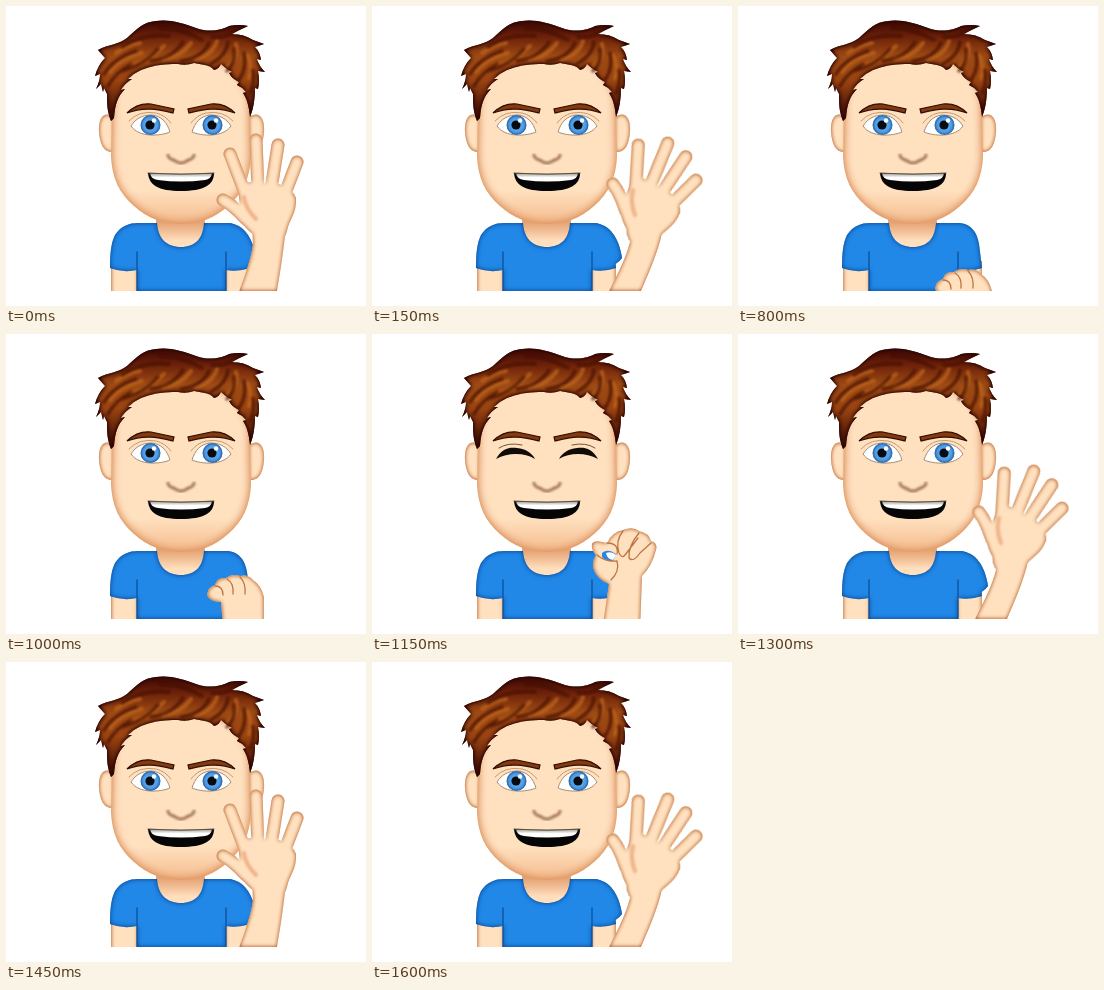
Animation of 360x300 px, one loop 1750 ms. Source, as an HTML page:

```html
<!DOCTYPE html>
<html lang="en">
<head>
<meta charset="utf-8">
<title>Waving cartoon man</title>
<style>
  html, body { margin: 0; width: 100%; height: 100%; overflow: hidden; background: #fff; }
  svg { display: block; width: 360px; height: 300px; }
  .skin { fill: #ffe1c0; }
  .shirt { fill: #2188e8; }
  .line { fill: none; stroke-linecap: round; stroke-linejoin: round; }
  .crease { stroke: #bd7544; stroke-width: 1.3; }
  .finger { stroke: #ffe1c0; }
  .strand { stroke: #420b05; stroke-width: 3; opacity: .75; filter: url(#soften); }
  .shine { stroke: #bd651f; stroke-width: 4; opacity: .75; filter: url(#soften); }
</style>
</head>
<body>
<svg viewBox="0 0 360 300">
  <defs>
    <clipPath id="frame"><rect width="360" height="285"/></clipPath>
    <filter id="soften" x="-20%" y="-20%" width="140%" height="140%"><feGaussianBlur stdDeviation="1"/></filter>
    <linearGradient id="neckShade" x1="0" y1="0" x2="0" y2="1">
      <stop offset=".35" stop-color="#e5a273"/><stop offset=".8" stop-color="#ffdfbd"/>
    </linearGradient>
    <linearGradient id="faceShade" x1="0" y1="0" x2="0" y2="1">
      <stop offset=".8" stop-color="#ffe1c0"/><stop offset="1" stop-color="#f4bb8d"/>
    </linearGradient>
    <linearGradient id="hairShade" x1="0" y1="0" x2="0" y2="1">
      <stop offset="0" stop-color="#3d0805"/><stop offset=".16" stop-color="#6b2109"/>
      <stop offset=".36" stop-color="#9d4a14"/><stop offset=".6" stop-color="#994411"/>
      <stop offset=".9" stop-color="#4d1407"/>
    </linearGradient>
    <linearGradient id="toothShade" x1="0" y1="0" x2="0" y2="1">
      <stop offset="0" stop-color="#a4a299"/><stop offset=".5" stop-color="#fff"/>
    </linearGradient>
    <radialGradient id="iris">
      <stop offset=".3" stop-color="#65b5f4"/><stop offset=".75" stop-color="#4997e4"/>
      <stop offset="1" stop-color="#285b94"/>
    </radialGradient>
    <path id="eyeWhite" d="M125 120C130 112 137 109 146 109C155 110 161 116 164 126C155 130 133 132 125 120Z" fill="#fff" stroke="#a28e75"/>
    <path id="lidCrease" class="line" d="M123 115Q133 104 150 107Q159 109 165 117" stroke="#c39a73"/>
    <g id="iris-pupil">
      <circle cx="144.500" cy="119" r="10" fill="url(#iris)"/>
      <circle cx="144" cy="119" r="4.600" fill="#070b10"/>
      <circle cx="148" cy="114.500" r="2.200" fill="#fff"/>
    </g>
    <g id="closedEye">
      <path d="M124 125C130 114 138 113 145 114C154 115 160 119 163 125C153 119 137 118 124 125Z" fill="#110b08"/>
      <path class="line" d="M127 114Q136 108 150 111" stroke="#6f5140"/>
    </g>
    <path id="brow" d="M121 107C127 101 135 97 145 98L168 103L167 107C154 104 139 100 121 107Z" fill="#843a0c" stroke="#2d0d05" stroke-width="1.200"/>
  </defs>

  <g clip-path="url(#frame)">
    <g filter="url(#skinEdge)"><path class="skin" d="M105 255H132V297H105ZM219 255H244V297H219Z"/></g>
    <path d="M150 202H199V229Q194 243 175 243Q155 243 150 229Z" fill="url(#neckShade)"/>
    <g filter="url(#blueEdge)">
      <path class="shirt" d="M151 217C152 232 160 241 175 241C190 241 197 232 198 217L222 217C233 218 239 226 241 238L244 262Q232 266 220 264V297H131V264Q117 267 104 262C104 248 105 237 109 229C115 220 123 217 132 217Z"/>
      <path class="shirt" id="raisedSleeve" d="M205 217H222C238 218 247 232 250 252Q242 263 220 264L205 235Z"/>
    </g>
    <path class="line" d="M131 246V285M220 246V285" stroke="#10549c" stroke-width="1.400"/>

    <g filter="url(#skinEdge)">
      <path class="skin" d="M108 111C98 104 92 112 93 126C94 139 98 147 108 146Z"/>
      <path class="skin" d="M243 111C253 104 259 112 258 126C257 139 253 147 243 146Z"/>
    </g>
    <g filter="url(#faceEdge)">
      <path fill="url(#faceShade)" d="M106 95C110 64 133 48 175 48C217 48 240 64 244 95L245 150C244 172 237 187 222 200C208 212 194 218 175 218C156 218 142 212 128 200C113 187 106 172 105 150Z"/>
    </g>

    <g filter="url(#hairEdge)">
      <path fill="url(#hairShade)" d="M105 115C101 105 101 97 101 88L98 82L97 86L95 78L90 83Q94 75 94 68L89 70Q92 59 99 52L92 44C103 38 112 39 121 32C131 23 137 16 150 15C163 13 176 17 190 22C203 27 216 24 223 20Q233 18 242 20Q233 24 226 28Q238 28 247 34L258 38L249 41Q254 46 255 54L251 53Q253 60 259 66L252 65Q254 75 252 83L249 82C249 94 247 104 244 111C243 100 241 93 237 87L240 86Q236 81 231 79L233 76Q226 73 223 67L226 66Q219 62 215 58Q213 63 208 64Q205 60 199 59L188 57Q180 60 172 58Q151 57 135 64Q128 67 122 73L126 73Q119 77 115 84L119 83C112 90 109 98 108 112Z"/>
    </g>
    <g clip-path="url(#frame)">
      <path class="line shine" d="M104 66Q114 52 136 47M124 60Q145 54 158 40M157 53Q175 51 185 37M190 53Q207 49 211 35M222 60Q233 51 230 38M243 72Q247 62 241 49M110 47Q122 39 134 37"/>
      <path class="line strand" d="M98 68Q108 52 130 45M102 80Q110 66 125 58M115 65Q137 60 152 43M145 55Q167 52 177 36M175 55Q196 52 203 37M205 58Q220 50 222 36M221 65Q230 56 228 43M233 74Q241 63 238 47M244 87Q249 77 247 64M116 41Q136 27 163 30M154 22Q176 22 196 34M206 31Q217 32 226 27"/>
    </g>

    <g id="openEyes">
      <use href="#eyeWhite"/><use href="#eyeWhite" transform="matrix(-1 0 0 1 350 0)"/>
      <use href="#iris-pupil"/><use href="#iris-pupil" x="62"/>
      <use href="#lidCrease"/><use href="#lidCrease" transform="matrix(-1 0 0 1 350 0)"/>
    </g>
    <g id="closedEyes"><use href="#closedEye"/><use href="#closedEye" transform="matrix(-1 0 0 1 350 0)"/></g>
    <use href="#brow"/><use href="#brow" transform="matrix(-1 0 0 1 350 0)"/>
    <path class="line" d="M162 149C162 154 168 153 171 156Q175 158 179 156C182 153 188 154 188 149" stroke="#a6795b" stroke-width="3" filter="url(#soften)"/>
    <path d="M142 167Q175 169 208 167C208 179 198 185 175 185C152 185 143 179 142 167Z" fill="#050505"/>
    <path d="M144 167.500Q175 169 206 167.500Q205 173 199 174Q175 177 152 174Q145 173 144 167.500Z" fill="url(#toothShade)"/>
    <path class="line" d="M142 167Q175 169 208 167" stroke="#5b5047" stroke-width="1.200"/>

    <g id="wave" filter="url(#skinEdge)">
      <path class="skin" id="forearmIn" d="M246 219H280C278 242 275 262 269 297H229C237 274 245 255 247 238Z"/>
      <path class="skin" id="forearmOut" d="M258 222L290 227C286 247 276 268 264 297H231C243 273 254 253 258 236Z"/>
      <g id="hand">
        <path class="skin" d="M232 181Q240 174 254 177L273 178Q287 183 290 192C291 207 283 214 281 225Q277 239 265 241Q252 240 248 229C236 220 231 211 234 202Z"/>
        <path class="line finger" d="M217 194Q227 199 240 213M224 148L239 187M272 139L265 183M250 134L252 184M291 156L278 190" stroke-width="13"/>
        <path class="line" d="M238 191Q239 202 250 213" stroke="#efb488" stroke-width="4" filter="url(#soften)"/>
      </g>
    </g>

    <g id="restHand">
      <g filter="url(#skinEdge)">
        <path class="skin" d="M197 283Q198 275 205 273Q207 265 216 266Q222 261 230 264Q238 262 243 268Q251 273 254 285V325H214L211 290Q200 290 197 283Z"/>
      </g>
      <path class="line crease" d="M205 274Q213 274 213 283M217 267Q224 271 223 282M230 265Q236 271 235 282"/>
    </g>

    <g id="fist">
      <g filter="url(#skinEdge)">
        <path class="skin" d="M220 210Q222 206 230 208L235 209Q240 198 251 196Q261 192 267 197Q277 199 279 207Q286 209 284 216Q280 232 270 242L268 297H230L237 250Q225 245 222 236Q219 228 224 221Q219 216 220 210Z"/>
      </g>
      <path d="M230 219Q236 214 244 220L241 227Q235 228 230 223Z" fill="#2188e8"/>
      <path d="M234 219Q240 217 244 221L241 226Q235 225 234 219Z" fill="#fff"/>
      <path class="line crease" d="M235 209Q247 209 245 220M251 197Q243 207 247 219Q250 225 253 221L266 204M267 199Q256 212 257 224Q261 229 268 219L279 209M225 221Q233 228 245 227Q248 237 239 246"/>
    </g>
  </g>
</svg>
<script>
  const LOOP = 1750;
  const byId = id => document.getElementById(id);

  // Soft coloured shading just inside a shape's outline.
  function edgeFilter(id, color, blur, strength) {
    document.querySelector('defs').insertAdjacentHTML('beforeend', `
      <filter id="${id}" x="-10%" y="-10%" width="120%" height="120%" color-interpolation-filters="sRGB">
        <feGaussianBlur in="SourceAlpha" stdDeviation="${blur}" result="soft"/>
        <feFlood flood-color="${color}"/>
        <feComposite in2="soft" operator="out"/>
        <feComponentTransfer><feFuncA type="linear" slope="${strength}"/></feComponentTransfer>
        <feComposite in2="SourceAlpha" operator="in" result="edge"/>
        <feMerge><feMergeNode in="SourceGraphic"/><feMergeNode in="edge"/></feMerge>
      </filter>`);
  }
  edgeFilter('skinEdge', '#c9804f', 2.2, 1.7);
  edgeFilter('faceEdge', '#dd935f', 5, 1.6);
  edgeFilter('blueEdge', '#0b4d99', 2.5, 1.3);
  edgeFilter('hairEdge', '#2c0503', 2.5, 1.8);

  // Each step is [start time, value], held until the next step.
  function hold(id, property, steps) {
    const frames = steps.map(([time, value]) =>
      ({ offset: time / LOOP, [property]: value, easing: 'steps(1, end)' }));
    frames.push({ offset: 1, [property]: steps.at(-1)[1] });
    byId(id).animate(frames, { duration: LOOP, iterations: Infinity }).startTime = 0;
  }

  const poses = [
    [0, 'in'], [150, 'out'], [800, 'rest'], [1000, 'rise'],
    [1150, 'fist'], [1300, 'out'], [1450, 'in'], [1600, 'out']
  ];
  const show = (id, ...names) => hold(id, 'opacity',
    poses.map(([time, pose]) => [time, names.includes(pose) ? 1 : 0]));

  show('wave', 'in', 'out');
  show('forearmIn', 'in');
  show('forearmOut', 'out');
  show('raisedSleeve', 'in', 'out');
  show('restHand', 'rest', 'rise');
  show('fist', 'fist');
  show('closedEyes', 'fist');
  show('openEyes', 'in', 'out', 'rest', 'rise');

  byId('hand').style.transformOrigin = '265.5px 241px';
  hold('hand', 'transform', poses.map(([time, pose]) =>
    [time, `rotate(${pose === 'out' ? 24.5 : 0}deg)`]));
  hold('restHand', 'transform', poses.map(([time, pose]) =>
    [time, pose === 'rise' ? 'translate(4px, -22px)' : 'translate(0px, 0px)']));
</script>
</body>
</html>
```
